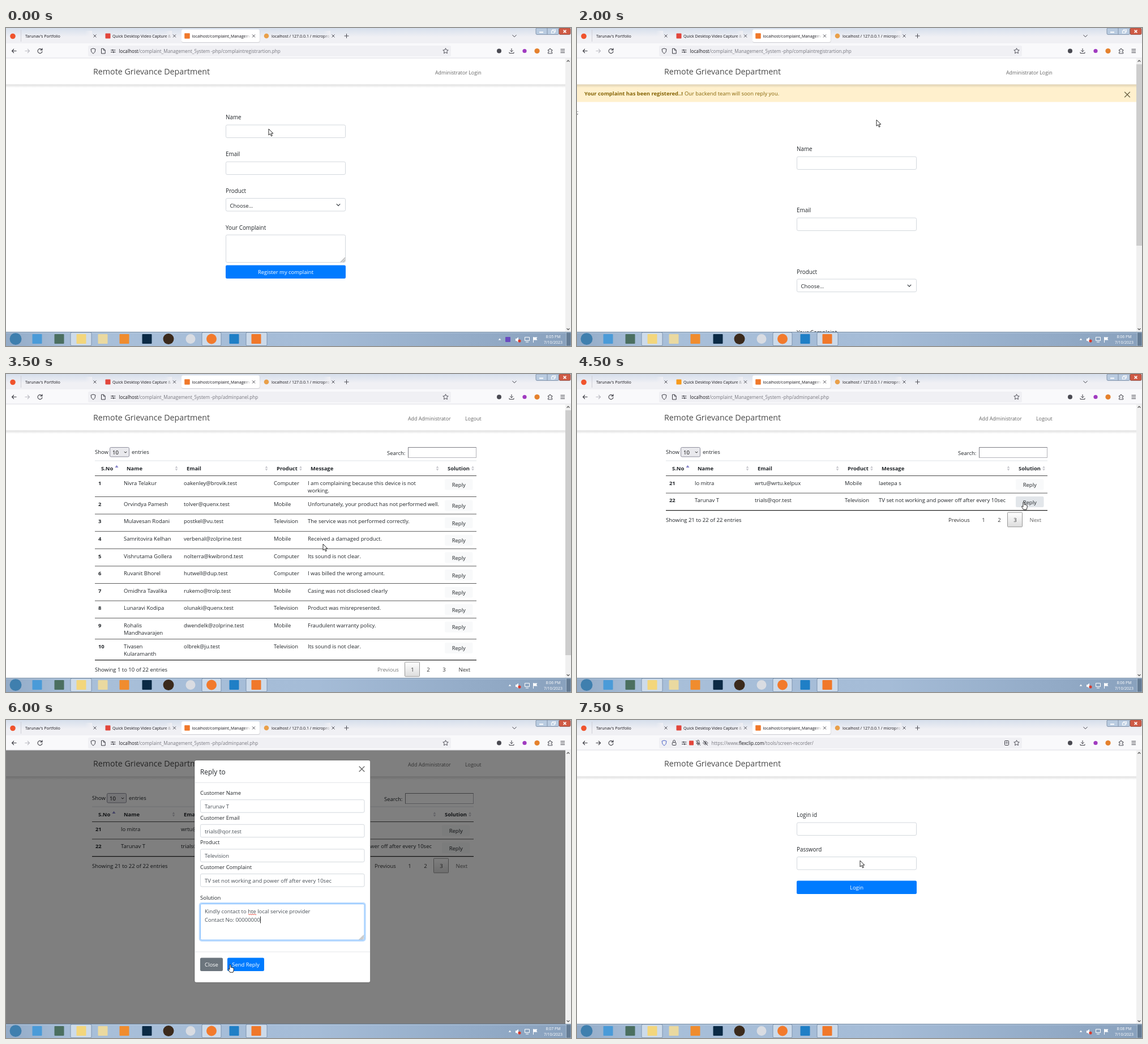
Recreate the animation shown at these times as an HTML page. Size 998x561 px, loop 8 s.

```html
<!DOCTYPE html>
<html lang="en">
<head>
<meta charset="utf-8">
<title>Complaint desk walkthrough</title>
<style>
  html, body { margin: 0; width: 100%; height: 100%; overflow: hidden; background: #fff; }
  svg { display: block; }
  text { font-family: "Open Sans", "Noto Sans", sans-serif; }
</style>
</head>
<body>
<svg id="stage" width="100%" height="100%" viewBox="0 0 998 561">
  <defs>
    <linearGradient id="bar">
      <stop offset="0" stop-color="#93abc7"/><stop offset=".12" stop-color="#a8bfd9"/>
      <stop offset=".55" stop-color="#a5bcd7"/><stop offset=".8" stop-color="#95adc9"/>
      <stop offset="1" stop-color="#89a1bd"/>
    </linearGradient>
    <linearGradient id="glass" x2="0" y2="1">
      <stop offset="0" stop-color="#c4d3e6" stop-opacity=".6"/><stop offset="1" stop-color="#c4d3e6" stop-opacity="0"/>
    </linearGradient>
    <linearGradient id="shade" x2="0" y2="1">
      <stop offset="0" stop-opacity=".13"/><stop offset="1" stop-opacity="0"/>
    </linearGradient>
    <linearGradient id="page" x2="0" y2="1">
      <stop offset="0" stop-color="#fff"/><stop offset="1" stop-color="#dcdcdc"/>
    </linearGradient>
    <linearGradient id="fadeTab">
      <stop offset="0" stop-color="#f0f0f4" stop-opacity="0"/><stop offset="1" stop-color="#f0f0f4"/>
    </linearGradient>
    <linearGradient id="fadeActive">
      <stop offset="0" stop-color="#fff" stop-opacity="0"/><stop offset="1" stop-color="#fff"/>
    </linearGradient>
  </defs>
  <g id="content"></g>
  <g id="browser"></g>
  <g id="taskbar"></g>
  <g id="pointer"></g>
</svg>
<script>
const STEP = 500, LOOP = 8000;
const INK = '#212529', GREY = '#495057', BLUE = '#007bff', EDGE = '#d3d8dd';
const USER = 'Tarunav T', MAIL = 'trials@qor.test';
const TROUBLE = 'TV set not working and power off after every 10sec';
const SITE = '/complaint_Management_System -php/';

// Drawing helpers; text is placed by the middle of its line.
const text = (x, y, s, size = 9.5, fill = INK, extra = '') =>
  `<text x="${x}" y="${y + size * 0.32}" font-size="${size}" fill="${fill}" ${extra}>${s}</text>`;
const bold = (x, y, s, size = 9.4, fill = INK) => text(x, y, s, size, fill, 'font-weight="700"');
const mid = (x, y, s, size, fill) => text(x, y, s, size, fill, 'text-anchor="middle"');
const rect = (x, y, w, h, fill, extra = '') =>
  `<rect x="${x}" y="${y}" width="${w}" height="${h}" fill="${fill}" ${extra}/>`;
const dot = (x, y, r, fill) => `<circle cx="${x}" cy="${y}" r="${r}" fill="${fill}"/>`;
const square = (x, y, size, fill) => rect(x - size / 2, y - size / 2, size, size, fill, 'rx="1"');
const line = (d, stroke = '#333', w = 1, extra = '') =>
  `<path d="${d}" fill="none" stroke="${stroke}" stroke-width="${w}" ${extra}/>`;
const shape = (d, fill) => `<path d="${d}" fill="${fill}"/>`;
const cross = (x, y, r, stroke, w) =>
  line(`M${x - r} ${y - r}l${2 * r} ${2 * r}m0 ${-2 * r}l${-2 * r} ${2 * r}`, stroke, w);
const chevron = (x, y, r, stroke, w = 1) => line(`M${x - r} ${y - r / 2}l${r} ${r}l${r} ${-r}`, stroke, w);

function box(x, y, w, h, focused) {
  const glow = focused
    ? rect(x - 1, y - 1.5, w + 2, h + 2, 'none', 'rx="3.5" stroke="#007bff" stroke-opacity=".27" stroke-width="2.4"') : '';
  return glow + rect(x + .5, y, w - 1, h - 1, '#fff', `rx="2.3" stroke="${focused ? '#80bdff' : EDGE}"`);
}
const field = (x, y, w, value = '', focused = false) => box(x, y, w, 23.5, focused) + text(x + 8, y + 12.5, value, 9.5, GREY);
const button = (x, y, w, label, fill = BLUE, h = 23.5, ink = '#fff') =>
  rect(x, y - .5, w, h, fill, 'rx="2.3"') + mid(x + w / 2, y + h / 2 + .7, label, 9.45, ink);
const grip = (x, y) => line(`M${x - 9} ${y}l8 -8m-5.5 8l5.5 -5.5m-3 5.5l3 -3`, '#777', .9);
const caret = (x, y) => line(`M${x} ${y - 6}v12`, '#111', .9);

// Page parts
const header = links =>
  rect(0, 53, 988, 46.5, '#fff') + rect(0, 99.5, 988, 6, 'url(#shade)') +
  text(154, 77.5, 'Remote Grievance Department', 14.26, '#4a4a4a') +
  links.map(([x, s]) => text(x, 79.3, s, 8.86, '#666')).join('');
const adminLinks = [[710, 'Add Administrator'], [811, 'Logout']];

function select(y, value) {
  return box(388, y, 212, 23.5) + text(395.5, y + 13, value) + chevron(587, y + 11.5, 3.2, '#343a40', 1.2);
}

function form({ name, mail, product = 'Choose...', note = '', focus, hover }) {
  const lines = note ? ['TV set not working and power off', 'after every 10sec'] : [];
  return text(388, 158, 'Name', 9.9) + field(388, 171, 212, name, focus == 0) +
    text(388, 223, 'Email', 9.9) + field(388, 236, 212, mail, focus == 1) +
    text(388, 287.5, 'Product', 9.9) + select(300.5, product) +
    text(388, 352.5, 'Your Complaint', 9.9) + box(388, 365, 212, 49.5, focus == 3) +
    lines.map((s, i) => text(396, 378 + i * 14.5, s, 9.5, GREY)).join('') + grip(600, 413) +
    button(388, 419, 212, 'Register my complaint', hover ? '#0069d9' : BLUE) + header([[758, 'Administrator Login']]);
}

function registered() {
  return rect(0, 99, 988, 31.5, '#fff0cd') +
    bold(13, 116, 'Your complaint has been registered..!', 9.4, '#856404') +
    text(190, 116, 'Our backend team will soon reply you.', 9.4, '#856404') +
    cross(972, 117.5, 4.8, '#6b6144', 1.3) + text(0, 149, ';') +
    text(388, 214, 'Name', 9.9) + field(388, 227, 212) +
    text(388, 322, 'Email', 9.9) + field(388, 335, 212) +
    text(388, 430.5, 'Product', 9.9) + select(443, 'Choose...') +
    text(388, 538, 'Your Complaint', 9.9) + header([[758, 'Administrator Login']]);
}

function login({ id, dots = 0, focus, hover }) {
  let out = text(388, 168, 'Login id', 9.9) + field(388, 181, 212, id, focus == 0) +
    text(388, 228.5, 'Password', 9.9) + field(388, 241.5, 212, '', focus == 1);
  for (let i = 0; i < dots; i++) out += dot(398.7 + i * 6, 254, 2.6, GREY);
  if (focus == 1) out += caret(396 + dots * 6.2, 253);
  return out + button(388, 284, 212, 'Login', hover ? '#0069d9' : BLUE) + header([]);
}

const people = [
  ['Nivra Telakur', 'oakenley@brovik.test', 'Computer', 'I am complaining because this device is not|working.'],
  ['Orvindya Pamesh', 'tolver@quenx.test', 'Mobile', 'Unfortunately, your product has not performed well.'],
  ['Mulavesan Rodani', 'postkel@vu.test', 'Television', 'The service was not performed correctly.'],
  ['Samritovira Kelhan', 'verbenal@zolprine.test', 'Mobile', 'Received a damaged product.'],
  ['Vishrutama Gollera', 'nolterra@kwibrond.test', 'Computer', 'Its sound is not clear.'],
  ['Ruvanit Bhorel', 'hutwell@dup.test', 'Computer', 'I was billed the wrong amount.'],
  ['Omidhra Tavalika', 'rukemo@trolp.test', 'Mobile', 'Casing was not disclosed clearly'],
  ['Lunaravi Kodipa', 'olunaki@quenx.test', 'Television', 'Product was misrepresented.'],
  ['Rohalis|Mandhavarajen', 'dwendelk@zolprine.test', 'Mobile', 'Fraudulent warranty policy.'],
  ['Tivasen|Kularamanth', 'olbrek@ju.test', 'Television', 'Its sound is not clear.']
];
const latest = [['lo mitra', 'wrtu@wrtu.kelpux', 'Mobile', 'laetepa s'], [USER, MAIL, 'Television', TROUBLE]];

function sorter(x, y) {
  return shape(`M${x - 2.3} ${y - .8}l2.3 -3.4l2.3 3.4z`, '#c6c6cc') + shape(`M${x - 2.3} ${y + .8}l2.3 3.4l2.3 -3.4z`, '#c6c6cc');
}

function panel(rows, first, dy, hover = -1) {
  const columns = [[168, 'S.No'], [213, 'Name'], [319, 'Email'], [478, 'Product'], [538, 'Message'], [780, 'Solution']];
  const rule = (y, c, w = 1) => line(`M157 ${y}H831`, c, w);
  let out = text(157, 138 + dy, 'Show') +
    rect(183.5, 129.5 + dy, 34, 16.5, '#e9e9ed', 'rx="2" stroke="#8f8f9d"') + text(188, 138.5 + dy, '10', 9.5, '#000') +
    chevron(211, 138 + dy, 2.2, '#222') + text(222, 138 + dy, 'entries') +
    text(673, 139.5 + dy, 'Search:') + rect(710.5, 129.5 + dy, 120, 18, '#fff', 'stroke="#b4b4ba"') +
    line(`M710.5 ${147.5 + dy}v-18h120`, '#7c7c84') +
    rule(153 + dy, '#dee2e6') + columns.map(([x, s]) => bold(x, 167 + dy, s)).join('') +
    [301, 460, 520.5, 762, 824.5].map(x => sorter(x, 166.5 + dy)).join('') +
    shape(`M192.5 ${165 + dy}l3 -4.2l3 4.2z`, '#8583c9') + rule(179.5 + dy, '#4a4a4a');
  let y = 179.5 + dy;
  rows.forEach((row, i) => {
    const cells = row.map(s => s.split('|'));
    const tall = cells.some(c => c.length > 1);
    out += bold(163, y + 13.2, first + i);
    cells.forEach((parts, k) => parts.forEach((s, n) =>
      out += text([208, 314, 473, 533][k], y + 13.2 + n * 13.3, s)));
    out += button(775, y + 6.5, 49.5, 'Reply', i == hover ? '#e2e6ea' : '#f8f9fa', 19, INK);
    y += tall ? 37 : 30.6;
    out += rule(y, i == rows.length - 1 ? '#222' : '#5c5c5c', i == rows.length - 1 ? 1.3 : 1);
  });
  y += 17;
  const last = first + rows.length - 1, current = Math.ceil(first / 10);
  out += text(157, y, `Showing ${first} to ${last} of 22 entries`) +
    text(656, y + .5, 'Previous', 9.5, current > 1 ? '#333' : '#777') +
    rect(705 + (current - 1) * 28 - .5, y - 13.5, 26, 25.5, 'url(#page)', 'rx="1" stroke="#979797"');
  for (let n = 1; n < 4; n++) out += mid(718 + (n - 1) * 28, y + .5, n, 9.5, '#333');
  return out + text(799.5, y + .5, 'Next', 9.5, current < 3 ? '#333' : '#666');
}

const admin = (...args) => panel(...args) + header(adminLinks);

function sent() {
  return admin(people, 1, 41) +
    rect(157.5, 129.5, 673, 30, '#cfead9', 'rx="2.3" stroke="#c3e6cb"') +
    text(169.5, 146, 'Your reply was send to given email id..!', 9.5, '#155724') +
    cross(815, 147.5, 4.8, '#577562', 1.3);
}

function reply(lines) {
  const squiggle = 'M428 343' + 'q.9 -2 1.75 0t1.75 0'.repeat(4);
  const labels = ['Customer Name', 'Customer Email', 'Product', 'Customer Complaint'];
  const widths = [0, 187, 98];
  let out = `<g transform="translate(-5 0)">${panel(latest, 21, 0)}</g>` + header(adminLinks) +
    rect(0, 53, 988, 483, '#000', 'opacity=".5"') +
    rect(333, 71, 310.5, 392, '#fff', 'rx="3" stroke="#000" stroke-opacity=".3"') +
    text(343, 92, 'Reply to', 11.9) + cross(628.5, 86.5, 4.8, '#666', 1.3) +
    line('M334 110.5H643M334 409H643', '#e3e6e9');
  labels.forEach((s, i) => {
    const y = 129 + i * 43.6;
    out += text(343, y, s, 9.45) + field(343, y + 11.7, 290.5, latest[1][i]);
  });
  out += text(343, 313.5, 'Solution', 9.45) + box(343, 324.5, 290.5, 64.5, true) + grip(633, 387.5) +
    lines.map((s, i) => text(351, 338 + i * 14.7, s, 9.5, GREY)).join('') +
    caret(351.5 + widths[lines.length], 338 + Math.max(0, lines.length - 1) * 14.5);
  if (lines.length) out += line(squiggle, '#e23b2e', .9);
  return out + button(343, 420, 40, 'Close', '#6c757d') + button(391, 420, 65, 'Send Reply');
}

// Browser frame
function tab(x, end, title, fade) {
  return `<svg x="${x}" y="2" width="${end - x}" height="24">${text(0, 12.3, title, 7.1, '#15141a')}</svg>` +
    rect(end - 12, 5, 12, 18, `url(#${fade})`);
}

function browser({ file, key, away, thumb, orange }) {
  const ink = '#3c3c44';
  let out = rect(0, 0, 998, 27.5, '#f0f0f4') + rect(0, 0, 998, 16, 'url(#glass)') +
    rect(0, 27, 998, 26, '#f9f9fb') + line('M0 53H998', '#dcdce2') +
    dot(12, 14.5, 4.8, '#f0532d') + line('M26.5 3V24', '#cfcfd8') +
    rect(310, 3, 138.5, 23, '#000', 'rx="3" opacity=".13"') + rect(310, 2.5, 138, 22.5, '#fff', 'rx="3"') +
    tab(34, 152, "Tarunav's Portfolio", 'fadeTab') +
    tab(188, 293, 'Quick Desktop Video Capture &amp; Share', 'fadeTab') +
    tab(328.5, 432, 'localhost/complaint_Management_System', 'fadeActive') +
    tab(469, 573, 'localhost / 127.0.0.1 / microproject', 'fadeTab') +
    square(180, 14, 9, orange ? '#f79a1c' : '#e2463c') + square(320, 14, 9.5, '#f0782a') + dot(460, 14, 4.3, '#e9a04a') +
    [157, 297.5, 437.5, 578].map(x => cross(x, 14, 2.5, ink, .9)).join('') +
    line('M597.5 14h8m-4 -4v8', ink, .9) + chevron(898, 14, 3.5, ink);
  out += rect(936, 0, 40.5, 11.5, '#b9cbe0', 'rx="2" stroke="#71859e" stroke-width=".8"') +
    rect(977, 0, 20, 11.5, '#cf5a45', 'rx="2" stroke="#8a4a40" stroke-width=".8"') +
    line('M956 0V11.5', '#71859e', .8) + line('M942 7.5h7', '#fff', 2) +
    line('M963.5 5h5v4h-5zM965.5 5v-2h5v4h-2', '#fff', 1.1) + cross(987, 6, 2.4, '#fff', 1.5);
  const forward = away ? ink : '#b9b9c0';
  out += line('M18.5 40.5h-8m3.5 -3.5l-3.5 3.5l3.5 3.5', ink, 1.1) +
    line('M33.5 40.5h8m-3.5 -3.5l3.5 3.5l-3.5 3.5', forward, 1.1) +
    line('M63.2 38.2a4 4 0 1 0 .8 3M64 35.5v3.4h-3.4', ink, 1.1) +
    rect(145, 31, 641, 19, '#f0f0f4', 'rx="2.5"') +
    line('M154 36l4 1.3q0 6 -4 8q-4 -2 -4 -8z', away ? '#4a63c8' : ink) +
    (away ? rect(168.3, 39.5, 6.5, 5, 'none', `rx="1" stroke="${ink}"`) + line('M169.7 39.5v-2a1.9 1.9 0 0 1 3.8 0v2', ink)
      : line('M168.5 36.3h4l2.7 2.7v6h-6.7zM172.3 36.5v2.7h2.7', ink)) +
    line('M185 39h2m3 0h3.5M185 42.5h3.5m3 0h2', ink) + dot(188.4, 39, 1.3, ink) + dot(190, 42.5, 1.3, ink);
  if (away) {
    out += square(202, 40.5, 8, '#e2463c') +
      line('M212.5 37a1.5 1.5 0 0 1 3 0v3a1.5 1.5 0 0 1 -3 0zM211 40q0 3 3 3t3 -3M214 43v2M210 36l8 9', ink, .9) +
      line('M222.5 40.5q4.3 -6 8.6 0q-4.3 6 -8.6 0M223 36l8 9', ink, .9) + dot(226.8, 40.5, 1.5, ink) +
      text(237.5, 41, 'https://www.<tspan fill="#15141a">flexclip.com</tspan>/tools/screen-recorder/', 8.1, '#76767e') +
      rect(755.5, 36.5, 7, 8, 'none', `rx="1" stroke="${ink}"`) + line('M757 39h4m-4 2h4', ink, .8);
  } else {
    if (key) out += `<circle cx="203.5" cy="40.5" r="2" fill="none" stroke="${ink}"/>` + line('M205.5 40.5h6v2m-2 -2v1.5', ink);
    out += text(key ? 217 : 199.5, 41, `<tspan fill="#15141a">localhost</tspan>${SITE}${file}`, 8.17, '#76767e');
  }
  out += line('M776.5 35.7l1.4 3l3.3 .4l-2.4 2.3l.6 3.3l-2.9 -1.6l-2.9 1.6l.6 -3.3l-2.4 -2.3l3.3 -.4z', ink, .9) +
    dot(871, 40.5, 4, '#4a4a52') + line('M893 36v6m-2.7 -2.7l2.7 2.7l2.7 -2.7M889 42.5v2h8v-2', ink) +
    dot(916, 40.5, 3.6, '#a03ac0') + dot(938, 40.5, 4.6, '#e5812d') +
    line('M957.5 38.5h2.2q-.5 -2.4 1.3 -2.4t1.3 2.4h2.5v2q-2 -.4 -2 1.2t2 1.2v2h-7.3v-2.2q2 .2 2 -1.2t-2 -1.2z', ink, .9) +
    line('M979.5 37.5h7.5m-7.5 3h7.5m-7.5 3h7.5', ink);
  out += rect(988, 53.5, 10, 482.5, '#f0f0f0') + line('M990.6 59.5l2.4 -2.4l2.4 2.4M990.6 530l2.4 2.4l2.4 -2.4', '#555', 1.2);
  return thumb ? out + rect(988, 64, 10, thumb - 64, '#cdcdcd') : out;
}

function taskbar(clock, extra) {
  const open = (x, w) => rect(x, 537, w, 23.5, '#e6eef7', 'rx="2" fill-opacity=".6" stroke="#6f87a3" stroke-width=".8"');
  const squares = [[55, '#4a9bd8'], [94, '#4b6f60'], [133, '#f3d67c'], [171, '#ead9a0'], [209, '#f08c2e'],
    [249, '#0b2a45'], [403, '#1f7fc6'], [442, '#f0782a']];
  const dots = [[17, 10.5, '#3f7fae'], [287, 9.5, '#3b2a1c'], [326, 8.5, '#d9dce2'], [363, 9, '#f27a2c']];
  const x = extra ? 872 : 890;
  return rect(0, 536, 998, 25, 'url(#bar)') + line('M0 536.5H998', '#667f9b', 1) + line('M0 537.5H998', '#c7d7e8', .8) +
    open(114, 37) + open(346, 34) + open(424, 37) +
    squares.map(([sx, c]) => square(sx, 548.5, 17, c)).join('') +
    dots.map(([dx, r, c]) => dot(dx, 548.5, r, c)).join('') +
    shape(`M${x - 2.3} 550.5l2.3 -3l2.3 3z`, '#fff') + (extra ? square(886.5, 549.5, 9, '#6a4bc0') : '') +
    shape('M900 548h2l3 -2.5v9l-3 -2.5h-2z', '#fff') + dot(907, 552, 2.6, '#d63a2f') +
    line('M916.5 545.5h8v6h-8zM918 554h5', '#fff') +
    line('M931.5 545v10', '#fff') + shape('M932 545.5h6.5l-1.5 2.5l1.5 2.5h-6.5z', '#fff') +
    mid(966.5, 544.5, clock, 7, '#fff') + mid(966.5, 554.5, '7/10/2023', 7, '#fff') +
    rect(989.5, 537, 8.5, 24, '#51687f', 'fill-opacity=".65" stroke="#c7d7e8" stroke-width=".6"');
}

function pointer(x, y, hand) {
  const d = hand
    ? 'M-1.1 .3q1.1 -1.2 2.2 0v4.2q1.2 -.7 1.9 .3q1.2 -.5 1.7 .4q1.4 -.3 1.5 1v3.2l-1.2 3.8h-5.3l-3.2 -4.8q-.2 -1.6 1.4 -1l1 1z'
    : 'M0 0V11l2.6 -2.4l1.9 4.2l1.8 -.8l-1.9 -4h3.5z';
  return `<path transform="translate(${x} ${y})" d="${d}" fill="#fff" stroke="#111" stroke-width=".9" stroke-linejoin="round"/>`;
}

// One entry per half second: page, browser state, clock, pointer.
const REG = { file: 'complaintregistrartion.php' };
const SIGN = { file: 'admin_login.php', key: true };
const PANEL = { file: 'adminpanel.php' };
const LIST = { ...PANEL, thumb: 496 }, LONG = { ...PANEL, thumb: 464 };
const OPENING = 'Kindly contact to hte local service provider';
const steps = [
  [() => form({}), REG, '8:05 PM', [464, 178]],
  [() => form({ name: USER, focus: 0 }), REG, '8:05 PM', [466, 182]],
  [() => form({ name: USER, mail: MAIL, product: 'Television' }), REG, '8:06 PM', [470, 312]],
  [() => form({ name: USER, mail: MAIL, product: 'Television', note: TROUBLE, hover: true }), REG, '8:06 PM', [500, 430, 1]],
  [registered, { ...REG, thumb: 384 }, '8:06 PM', [529, 162]],
  [() => login({ focus: 0 }), SIGN, '8:06 PM', [496, 190]],
  [() => login({ id: '123', dots: 3, focus: 1, hover: true }), SIGN, '8:06 PM', [517, 298, 1]],
  [() => admin(people, 1, 0), LIST, '8:06 PM', [560, 300]],
  [() => admin(people, 1, 0), LIST, '8:06 PM', [773, 520, 1]],
  [() => admin(latest, 21, 0, 1), { ...PANEL, orange: true }, '8:06 PM', [789, 226, 1]],
  [() => reply([]), PANEL, '8:07 PM', [460, 350]],
  [() => reply([OPENING]), PANEL, '8:07 PM', [460, 350]],
  [() => reply([OPENING, 'Contact No: 00000000']), PANEL, '8:07 PM', [396, 432, 1]],
  [sent, LONG, '8:08 PM', [379, 146]],
  [sent, LONG, '8:08 PM', [824, 77, 1]],
  [() => login({}), { away: true }, '8:08 PM', [500, 248]]
];

const layer = id => document.getElementById(id);
const start = performance.now();
let shown = -1;

function draw() {
  const now = Math.floor((performance.now() - start) % LOOP / STEP);
  if (now !== shown) {
    shown = now;
    const [page, state, clock, at] = steps[now];
    layer('content').innerHTML = rect(0, 53, 998, 508, '#fff') + page();
    layer('browser').innerHTML = browser(state);
    layer('taskbar').innerHTML = taskbar(clock, now === 0);
    layer('pointer').innerHTML = pointer(...at);
  }
  requestAnimationFrame(draw);
}
draw();
</script>
</body>
</html>
```
